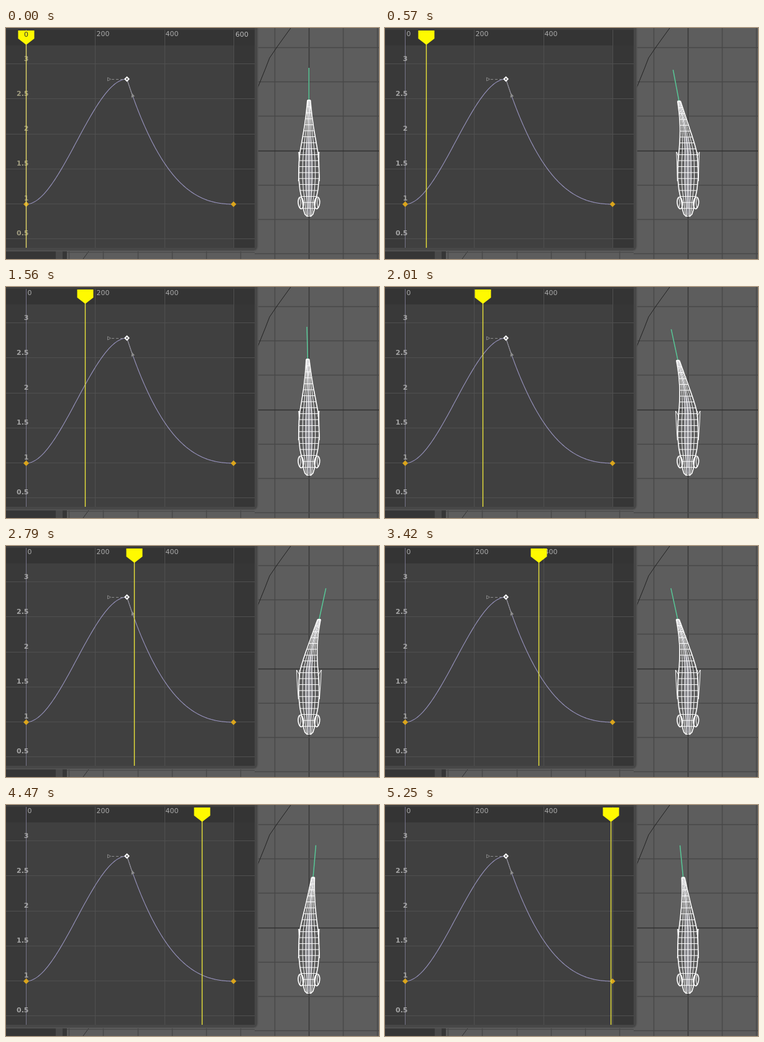
Recreate the animation shown at these times as an HTML page with a canvas. Size 600 px wide and 371 px high, loop 5280 ms.

```html
<!DOCTYPE html>
<html>
<head>
<meta charset="utf-8">
<style>
html, body { margin: 0; width: 100%; height: 100%; overflow: hidden; background: #5d5d5d; }
canvas { display: block; }
</style>
</head>
<body>
<canvas id="stage" width="600" height="371"></canvas>
<script>
const c = document.getElementById('stage').getContext('2d');
const LOOP = 5280, STEP = 30;
const START = 32.5, PEAK = 194.5, END = 366, BASE = 283, TOP = 82, SLOPE = 3.07;
const MID = 487.3, TAIL = 116, HIP = 205, NOSE = 303;

// Playhead position over time: [ms, x]
const headKeys = [[0, 32.5], [1110, 98.5], [2010, 157], [2790, 206.5], [3420, 247], [4470, 315], [5250, 363.5]];
// Body half-width along the fish: [y, width]
const profile = [[116, 2.4], [125, 3.2], [140, 4.8], [160, 7.5], [180, 11], [200, 14.5], [215, 16],
  [240, 16.5], [260, 14.5], [272, 12], [280, 10], [291, 9], [299, 6.5], [303, 2.5]];

function lookup(keys, t) {
  let i = 1;
  while (i < keys.length - 1 && keys[i][0] < t) i++;
  const [a, va] = keys[i - 1], [b, vb] = keys[i];
  return va + (vb - va) * (t - a) / (b - a);
}

function rect(x, y, w, h, color) {
  c.fillStyle = color;
  c.fillRect(x, y, w, h);
}

function path(points, color, width = 1, fill) {
  c.beginPath();
  points.forEach(([x, y]) => c.lineTo(x, y));
  if (fill) {
    c.closePath();
    c.fillStyle = fill;
    c.fill();
  }
  if (color) {
    c.strokeStyle = color;
    c.lineWidth = width;
    c.stroke();
  }
}

function label(text, x, y, font, color, align = 'left') {
  c.font = font + ' "DejaVu Sans", sans-serif';
  c.textAlign = align;
  c.fillStyle = color;
  c.fillText(text, x, y);
}

function diamond(x, y, r, fill) {
  path([[x - r, y], [x, y - r], [x + r, y], [x, y + r]], null, 0, fill);
}

function curveY(x) {
  if (x < PEAK) {
    const u = (x - START) / (PEAK - START);
    return BASE + (TOP - BASE) * u * u * (3 - 2 * u);
  }
  const span = END - PEAK, u = (x - PEAK) / span, s = u * u * (3 - 2 * u);
  return TOP + (BASE - TOP) * s + SLOPE * span * u * (1 - u) * (1 - u);
}

// The graphed value drives the swimming speed, so the phase is its integral.
function swimPhase(x) {
  let sum = 0;
  const n = 200, dx = (x - START) / n;
  for (let i = 0; i < n; i++) sum += (1 + (BASE - curveY(START + (i + 0.5) * dx)) / 112.3) * dx;
  return Math.PI * (sum * 3 / 81.5 + 0.45 * Math.max(0, (x - 315) / 48.5));
}

function viewport() {
  rect(0, 0, 600, 371, '#5d5d5d');
  for (let i = -7; i <= 2; i++) {
    const x = Math.round(487 + i * 55.1) + 0.5;
    path([[x, 0], [x, 371]], i ? '#484848' : '#363636', 1.4);
  }
  for (let i = -3; i <= 3; i++) {
    const y = Math.round(196.5 + i * 55.2) + 0.5;
    path([[400, y], [600, y]], i ? '#474747' : '#303030', 1.4);
  }
  path([[458, 0], [437, 29], [424, 48], [417, 66], [404, 98]], '#222');
  path([[135, 356], [124, 371]], '#333');
}

function fish(phase) {
  const s = Math.sin(phase);
  const reach = y => Math.max(0, (HIP - y) / (HIP - TAIL));
  const bend = y => 16.5 * s * reach(y) ** 1.5;
  const at = (y, side) => [MID + bend(y) + side * lookup(profile, y), y + 2 * s * s * reach(y)];
  const along = (side, from, to) => {
    const points = [];
    for (let y = from; y < to; y += 3) points.push(at(y, side));
    points.push(at(to, side));
    return points;
  };

  path([[MID + 27.5 * s, 64 + 4 * s * s], at(TAIL, 0)], '#58c797', 1.5);

  path(along(-0.4, 175, 300).concat(along(0.4, 175, 300).reverse()), null, 0, '#85858b');
  for (const side of [-0.62, -0.3, 0.3, 0.62]) path(along(side, TAIL, NOSE), '#fff');
  path(along(0, TAIL, 290), '#d8d8dc', 2);
  for (const side of [-1, 1]) path(along(side, TAIL, NOSE), '#fff', 1.6);
  for (let y = 117; y < 296; y += 9.6) path([at(y, -1), at(y, 1)], '#fff');
  path([at(TAIL, -1), at(TAIL, 1)], '#fff', 2);

  const spread = 16.5 + 3.5 * s ** 4;
  for (const d of [-1, 1]) {
    const x = v => MID + d * v;
    path([[x(14.5), 208], [x(spread), 199], [x(spread - 0.8), 216], [x(17), 246]], '#fff');
    path([[x(15), 199], [x(16), 225]], '#fff');
    c.beginPath();
    c.ellipse(x(13), 281, 4.3, 9.5, d * 0.1, 0, 7);
    c.strokeStyle = '#fff';
    c.lineWidth = 1.6;
    c.stroke();
    path([[x(14.5), 273], [x(13), 281], [x(14.5), 289]], '#fff');
  }
}

function panel() {
  rect(0, 358, 98, 13, '#363636');
  rect(80, 358, 11, 13, '#4a4a4a');
  path([[98, 360.5], [400, 360.5]], '#484848');
  c.beginPath();
  c.roundRect(-10, -10, 415, 368, 7);
  c.fillStyle = '#474747';
  c.fill();
  c.strokeStyle = '#565656';
  c.lineWidth = 1.5;
  c.stroke();
  rect(0, 0, 400, 353, '#404040');
  rect(0, 28, 32, 325, '#393939');
  rect(366, 28, 34, 325, '#363636');
  rect(0, 0, 400, 28, '#343434');
  rect(0, 0, 400, 3, '#3e3e3e');
  for (let i = 0; i < 6; i++) {
    const y = Math.floor(57.6 + i * 56.2) + 0.5;
    path([[0, y], [400, y]], '#505050');
  }
  for (const x of [143, 255, 366]) path([[x + 0.5, 3], [x + 0.5, 353]], '#505050');
  path([[32.5, 3], [32.5, 353]], '#77748a');
}

function graph(still) {
  const points = [];
  for (let x = START; x <= END; x += 1.5) points.push([x, curveY(x)]);
  points.push([END, BASE]);
  path(points, '#9793bd', 1.1);

  c.setLineDash([4, 3]);
  path([[170, 82.5], [191, 82.5]], '#8c8c8c');
  c.setLineDash([]);
  path([[163.5, 79.5], [168.5, 82.3], [163.5, 85], [163.5, 79.5]], '#858585');
  path([[PEAK, TOP], [203, 108]], '#8c8c8c');
  path([[202.5, 104.5], [207, 109.5], [201.5, 112]], null, 0, '#8c8c8c');
  diamond(PEAK, TOP, 4.5, '#fff');
  diamond(PEAK, TOP, 1.8, '#555');
  diamond(START, BASE, 4.5, '#dba51c');
  diamond(END, BASE, 4.5, '#dba51c');

  ['3', '2.5', '2', '1.5', '1', '0.5'].forEach((text, i) =>
    label(text, 36.5, 52.5 + i * 56.1, 'bold 11px', still ? '#a09c80' : '#a4a4a4', 'right'));
  for (const v of [0, 200, 400]) label(v, 34.5 + v * 0.555, 13, '11px', '#aaa');
  if (still) label('600', 369, 14, '11px', '#bbb');
}

function playhead(pos, still) {
  const x = Math.floor(pos) + 0.5;
  path([[x, 26], [x, 353]], still ? '#e0d568' : '#e8e23a', 1.4);
  path([[x - 13, 4], [x + 13, 4], [x + 13, 17], [x, 27], [x - 13, 17]], null, 0, '#fffa00');
  if (still) label('0', x, 14, '11px', '#333', 'center');
}

function draw(now) {
  const t = Math.floor(now % LOOP / STEP) * STEP;
  const x = lookup(headKeys, t);
  viewport();
  fish(swimPhase(x));
  panel();
  graph(t === 0);
  playhead(x, t === 0);
}

const begin = performance.now();
function tick() {
  draw(performance.now() - begin);
  requestAnimationFrame(tick);
}
tick();
</script>
</body>
</html>
```
